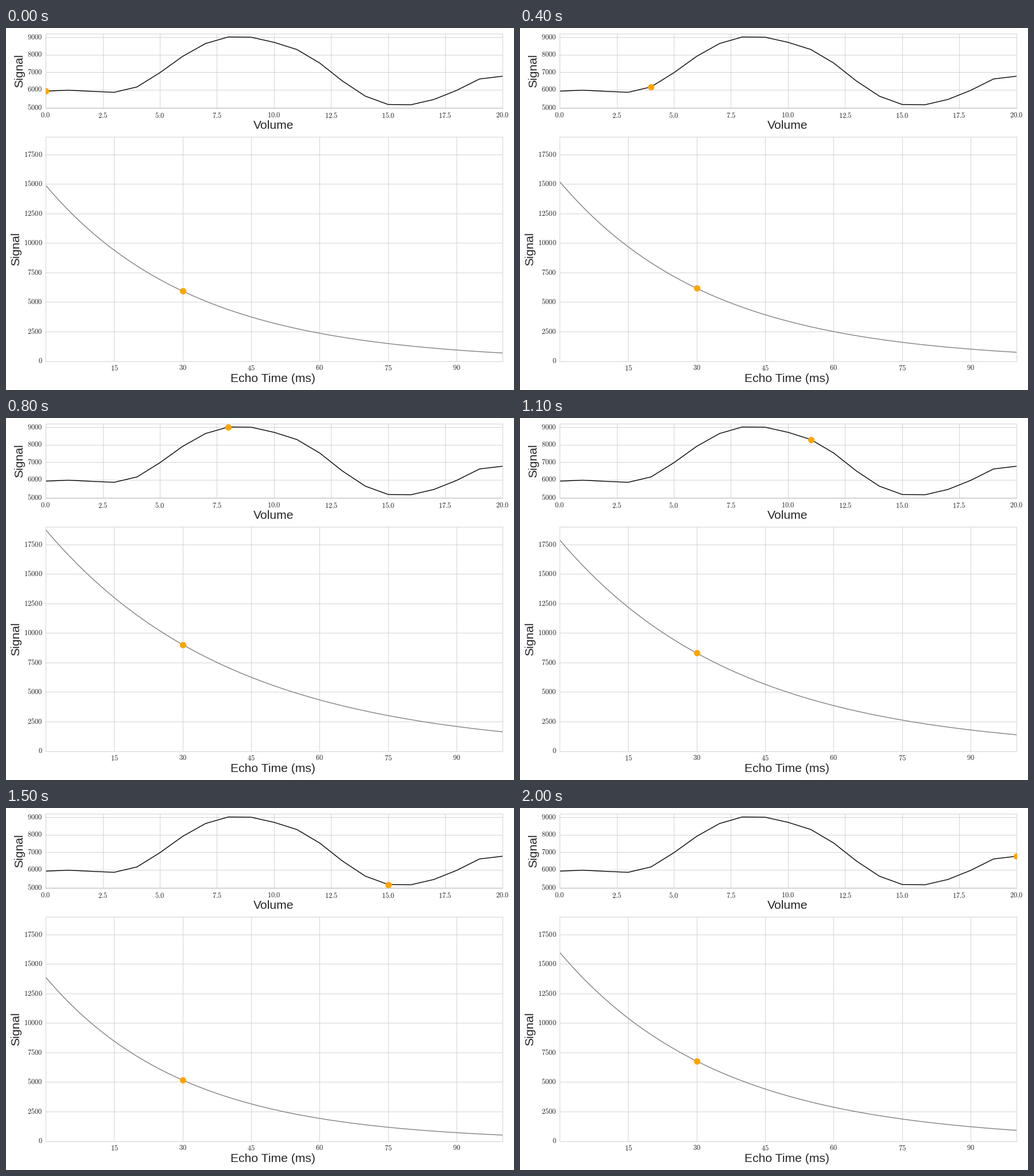
Recreate the animation shown at these times as a matplotlib script. Size 885x632 px, loop 2100 ms.

```python
import numpy as np
import matplotlib.pyplot as plt
from matplotlib.animation import FuncAnimation

W, H, DPI = 885, 632, 100
INK, RULE, DOT = "0.15", "0.8", "orange"
TE, S0, T2 = 30, 16000, 35

plt.rcParams.update({
    "font.family": "Liberation Sans",
    "mathtext.fontset": "cm",
    "text.color": INK,
})

signal = np.array([
    5925, 5980, 5915, 5860, 6165, 6975, 7910, 8640, 9015, 9000, 8710,
    8300, 7530, 6500, 5640, 5165, 5150, 5450, 5970, 6620, 6775,
])
volumes = np.arange(len(signal))
echo = np.linspace(0, 100, 201)


def decay(t, k):
    """Signal at echo time t when S0 and T2* both scale with k."""
    return S0 * k * np.exp(-t / (T2 * k))


# Invert the decay at TE to get the scale of each volume.
k_grid = np.linspace(0.7, 1.4, 2000)
scale = np.interp(signal, decay(TE, k_grid), k_grid)

fig = plt.figure(figsize=(W / DPI, H / DPI), dpi=DPI, facecolor="white")


def make_axes(top, bottom, xlim, ylim, xticks, yticks, xfmt):
    left, right = 69.1, 864.7
    ax = fig.add_axes([left / W, 1 - bottom / H,
                       (right - left) / W, (bottom - top) / H])
    ax.set(xlim=xlim, ylim=ylim)
    ax.set_axisbelow(True)
    ax.grid(color=RULE, lw=0.6)
    for spine in ax.spines.values():
        spine.set(color=RULE, lw=0.6)
    ax.tick_params(length=0, pad=4.2, labelsize=9, labelcolor=INK)
    ax.set_xticks(xticks, [rf"$\mathrm{{{v:{xfmt}}}}$" for v in xticks])
    ax.set_yticks(yticks, [rf"$\mathrm{{{v}}}$" for v in yticks], va="center")
    return ax


def label(x, y, text, **kw):
    fig.text(x / W, 1 - y / H, text, size=15.2, ha="center", **kw)


top_ax = make_axes(9.9, 139.9, (0, 20), (4957, 9203),
                   np.arange(0, 20.1, 2.5), range(5000, 9001, 1000), ".1f")
low_ax = make_axes(189.7, 581.6, (0, 100), (0, 19000),
                   range(15, 91, 15), range(0, 17501, 2500), "d")

label(466.5, 176.4, "Volume", va="baseline")
label(464.6, 617.5, "Echo Time (ms)", va="baseline")
label(24, 74.8, "Signal", va="center", rotation=90)
label(17.7, 386, "Signal", va="center", rotation=90)

top_ax.plot(volumes, signal, color="black", lw=1)
curve, = low_ax.plot([], [], color="gray", lw=1)

dot_style = dict(marker="o", ms=8, mew=0, color=DOT, ls="", zorder=3)
top_dot, = top_ax.plot([], [], **dot_style)
low_dot, = low_ax.plot([], [], **dot_style)


def update(i):
    curve.set_data(echo, decay(echo, scale[i]))
    top_dot.set_data([i], [signal[i]])
    low_dot.set_data([TE], [signal[i]])
    return curve, top_dot, low_dot


anim = FuncAnimation(fig, update, frames=len(signal), interval=100,
                     repeat=True, repeat_delay=0)
plt.show()
```
